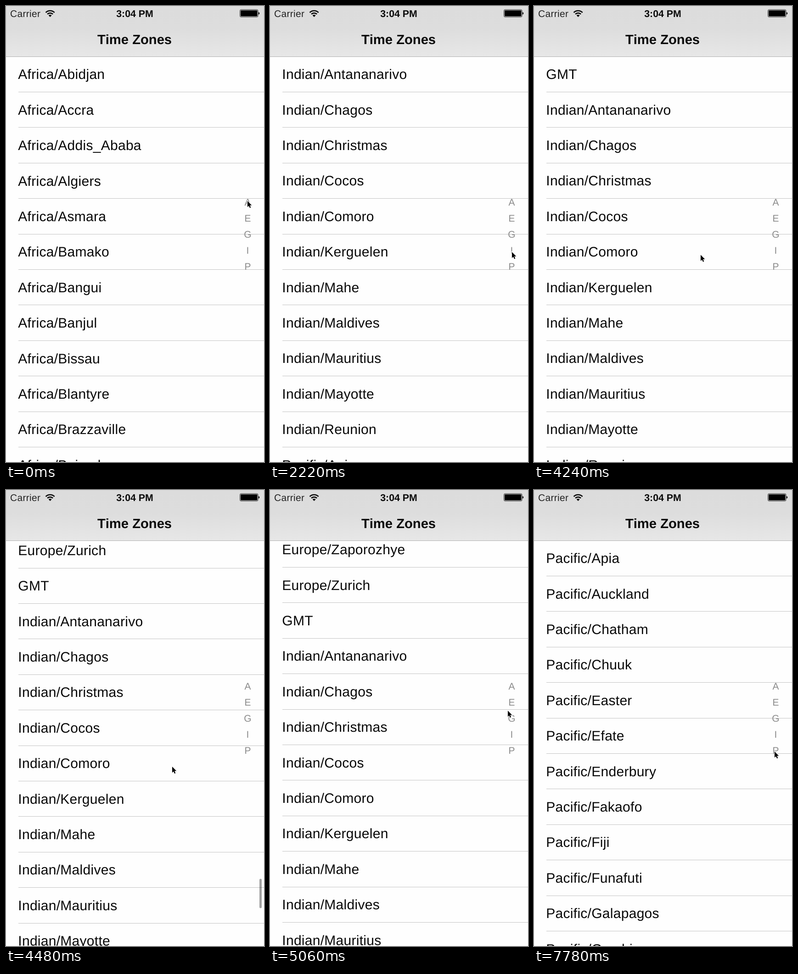
Animation of 562x994 px, one loop 7.8 s. Source, as an HTML page:

```html
<!DOCTYPE html>
<html lang="en">
<head>
<meta charset="utf-8">
<title>Time Zones</title>
<style>
  html, body { margin: 0; width: 100%; height: 100%; overflow: hidden; background: #fefefe; }
  svg { display: block; width: 100%; height: 100%; }
  text { font-family: "Liberation Sans", Arial, sans-serif; font-kerning: none; text-rendering: geometricPrecision; }
  #list text { font-size: 30px; letter-spacing: .28px; fill: #080808; }
  #list rect { fill: #c4c4c4; shape-rendering: crispEdges; }
  #index text { font-size: 21px; fill: #8a8a8a; text-anchor: middle; }
  .bold { font-weight: bold; text-anchor: middle; fill: #0a0a0a; }
</style>
</head>
<body>
<svg viewBox="0 0 562 994">
  <defs>
    <linearGradient id="bar" x1="0" y1="0" x2="0" y2="1">
      <stop offset="0" stop-color="#dcdcdc"/>
      <stop offset=".45" stop-color="#dddddd"/>
      <stop offset="1" stop-color="#e7e7e7"/>
    </linearGradient>
  </defs>
  <rect width="562" height="994" fill="#fefefe"/>
  <g id="list"></g>
  <g id="index"></g>
  <rect id="thumb" x="552" width="5" height="64" rx="2.5" fill="#000" fill-opacity=".36"/>

  <rect width="562" height="110" fill="url(#bar)"/>
  <rect y="110" width="562" height="1" fill="#b0b0b0"/>
  <text x="9" y="23.5" font-size="21" letter-spacing=".3" fill="#222">Carrier</text>
  <g fill="none" stroke="#0a0a0a" stroke-width="2.7">
    <path d="M86.6 14.2a13.4 13.4 0 0 1 19 0"/>
    <path d="M90.1 17.8a8.4 8.4 0 0 1 12 0"/>
    <path d="M96.1 24l-3.4-3.5a4.8 4.8 0 0 1 6.8 0z" fill="#0a0a0a" stroke="none"/>
  </g>
  <text class="bold" x="280.5" y="23.5" font-size="21.3">3:04 PM</text>
  <rect x="509.5" y="8" width="39.5" height="16" rx="2.5" fill="none" stroke="#222" stroke-width="1"/>
  <rect x="511" y="9.5" width="36.5" height="13" rx="1" fill="#000"/>
  <path d="M550 13.2q2.4 .6 2.4 2.8t-2.4 2.8z" fill="#111"/>
  <text class="bold" x="280" y="82.7" font-size="29.2">Time Zones</text>

  <path id="cursor" d="M0 0V13.2L3 10.4L5.1 15.2L7.3 14.2L5.2 9.6H9.3Z"
        fill="#000" stroke="#fff" stroke-width="1.8" paint-order="stroke"/>
</svg>
<script>
const LOOP = 7800, STEP = 20, ROW = 77.4, TOP = 110.5;
const NS = "http://www.w3.org/2000/svg";
const $ = id => document.getElementById(id);

const zones = [
  ["Africa", "Abidjan Accra Addis_Ababa Algiers Asmara Bamako Bangui Banjul Bissau Blantyre Brazzaville Bujumbura"],
  ["Europe", "Amsterdam Andorra Athens Belgrade Berlin Bratislava Brussels Bucharest Budapest Busingen Chisinau Copenhagen Zagreb Zaporozhye Zurich"],
  ["GMT", ""],
  ["Indian", "Antananarivo Chagos Christmas Cocos Comoro Kerguelen Mahe Maldives Mauritius Mayotte Reunion"],
  ["Pacific", "Apia Auckland Chatham Chuuk Easter Efate Enderbury Fakaofo Fiji Funafuti Galapagos Gambier"]
];

// time, section letter shown at the top
const jumps = [[0, "A"], [480, "E"], [1000, "G"], [1850, "I"], [2450, "P"], [3060, "I"],
  [3400, "G"], [6150, "I"], [6850, "P"]];

// time, x, y of the pointer tip
const pointer = [
  [0, 526, 425], [250, 526, 428], [480, 527, 446], [750, 527, 463], [1000, 528, 481],
  [1200, 528, 497], [1600, 528, 503], [1850, 528, 516], [2200, 527, 535], [2450, 527, 550],
  [2750, 527, 571], [2900, 527, 566], [3060, 527, 549], [3100, 527, 543], [3400, 528, 515],
  [3600, 527, 500], [3800, 515, 503], [4180, 366, 541], [4260, 362, 543], [4480, 362, 603],
  [4600, 363, 643], [4700, 372, 640], [4950, 500, 505], [5060, 518, 481], [5200, 521, 484],
  [5600, 522, 496], [6150, 522, 515], [6400, 523, 519], [6700, 523, 540], [6850, 523, 550],
  [7100, 524, 565], [7400, 524, 570]
];

// time, distance the list is pulled down
const pull = [[4260, 0], [4480, 60], [4600, 100], [4720, 122], [4820, 132], [4920, 135.7],
  [5140, 135.7], [5140, 0]];
const thumbFade = [[4260, 0], [4320, 1], [4860, 1], [5060, 0]];

function add(parent, name, attrs, label = "") {
  const el = document.createElementNS(NS, name);
  for (const key in attrs) el.setAttribute(key, attrs[key]);
  el.textContent = label;
  parent.append(el);
}

const starts = {};
let count = 0;
for (const [area, places] of zones) {
  starts[area[0]] = count;
  for (const place of places.split(" ")) {
    const y = TOP + count++ * ROW;
    add($("list"), "text", { x: 26.3, y: y + 48.8 }, place ? area + "/" + place : area);
    add($("list"), "rect", { x: 27, y: y + ROW - 0.9, width: 535, height: 1 });
  }
}
[..."AEGIP"].forEach((c, i) => add($("index"), "text", { x: 526.5, y: 434.5 + i * 35.1 }, c));

function sample(keys, t) {
  const next = keys.findIndex(k => k[0] > t);
  if (next === 0) return keys[0].slice(1);
  if (next < 0) return keys.at(-1).slice(1);
  const a = keys[next - 1], b = keys[next];
  const p = (t - a[0]) / (b[0] - a[0]);
  return a.slice(1).map((v, i) => v + (b[i + 1] - v) * p);
}

function draw(t) {
  const section = jumps.findLast(j => j[0] <= t)[1];
  const [shift] = sample(pull, t);
  const [x, y] = sample(pointer, t);
  $("list").setAttribute("transform", `translate(0 ${shift - starts[section] * ROW})`);
  $("thumb").setAttribute("y", 849.2 - shift * 0.028);
  $("thumb").setAttribute("opacity", sample(thumbFade, t)[0]);
  $("cursor").setAttribute("transform", `translate(${x} ${y})`);
}

const began = performance.now();
function tick() {
  const t = (performance.now() - began) % LOOP;
  draw(Math.floor(t / STEP) * STEP);
  requestAnimationFrame(tick);
}
tick();
</script>
</body>
</html>
```
